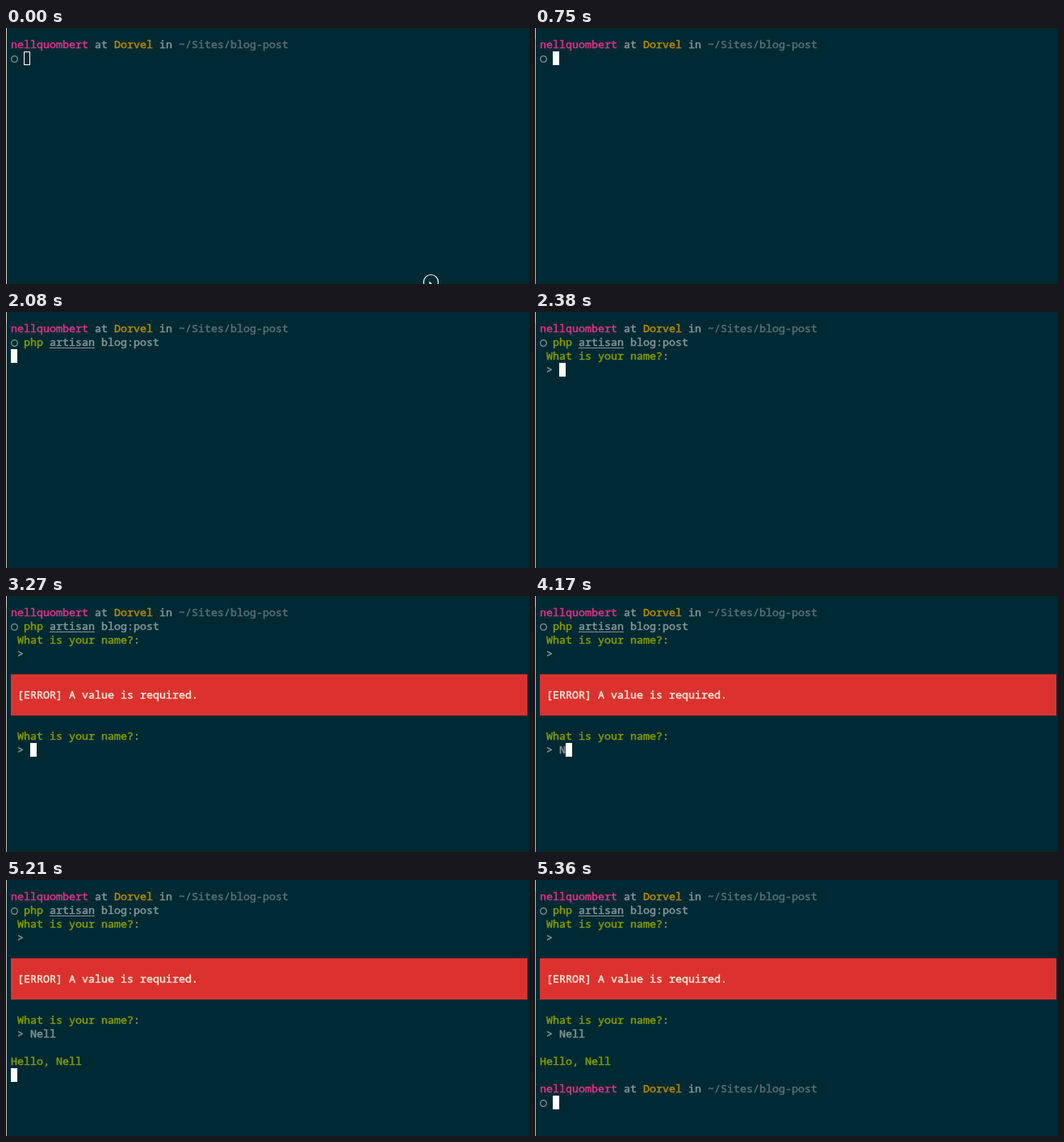
Animation, 648 px wide and 317 px high, one loop 7310 ms. Source, as an HTML page:

```html
<!DOCTYPE html>
<html lang="en">
<head>
<meta charset="utf-8">
<title>Terminal session</title>
<style>
  html, body { margin: 0; width: 100%; height: 100%; overflow: hidden; background: #002a33; }
  svg { display: block; width: 648px; height: 317px; }
  text {
    font: 500 13.333px "Noto Sans Mono", "DejaVu Sans Mono", monospace;
    white-space: pre; stroke-width: .5px; stroke-linejoin: round;
  }
</style>
</head>
<body>
<svg id="stage" viewBox="0 0 648 317"></svg>
<script>
const LOOP = 7310, CELL = 8, LINE = 17, LEFT = 6, TOP = 12;
const C = {
  bg: '#002a33', magenta: '#d9338a', yellow: '#b58900', green: '#859900',
  text: '#839496', dim: '#586e75', red: '#dc322f', pale: '#eee8d5', white: '#ffffff'
};
const USER = 'nellquombert', HOST = 'Dorvel', NAME = 'Nell';
const stage = document.getElementById('stage');
const timed = [];
const x = col => LEFT + col * CELL;
const y = row => TOP + row * LINE;

function add(tag, attrs, from = 0, to = LOOP) {
  const node = document.createElementNS('http://www.w3.org/2000/svg', tag);
  for (const key in attrs) node.setAttribute(key, attrs[key]);
  stage.append(node);
  if (from > 0 || to < LOOP) timed.push({ node, from, to });
  return node;
}

// The thin stroke gives the text its semi-bold weight
function write(col, row, string, fill, from, to) {
  add('text', { x: x(col), y: y(row) + 13, fill, stroke: fill }, from, to).textContent = string;
}

function block(col, row, from, to) {
  add('rect', { x: x(col), y: y(row), width: CELL, height: LINE, fill: C.white }, from, to);
}

function prompt(row, from) {
  const parts = [[USER, C.magenta], ['at', C.text], [HOST, C.yellow],
                 ['in', C.text], ['~/Sites/blog-post', C.dim]];
  let col = 0;
  for (const [string, fill] of parts) {
    write(col, row, string, fill, from);
    col += string.length + 1;
  }
  add('circle', { cx: x(0) + 4.5, cy: y(row + 1) + 9.5, r: 3.8, fill: 'none',
                  stroke: C.text, 'stroke-width': 1.3 }, from);
}

function question(row, from) {
  write(1, row, 'What is your name?', C.green, from);
  write(19, row, ':', C.text, from);
  write(1, row + 1, '>', C.text, from);
}

// Window edge, dimmer once the window has focus
add('rect', { x: 0, y: 0, width: 1, height: 317, fill: '#c8ced0' });
add('rect', { x: 0, y: 14, width: 1, height: 303, fill: '#adb5b8' }, 750);

// Mouse pointer with its ring
add('circle', { cx: 526.5, cy: 314.5, r: 9.9, fill: '#001c23' }, 0, 150);
add('circle', { cx: 526.5, cy: 314.5, r: 9, fill: C.bg, stroke: C.white, 'stroke-width': 1.2 }, 0, 150);
add('path', { d: 'M524.5 313.5v5.5l3.5-2z', fill: C.white }, 0, 150);

// Commands
prompt(0);
write(2, 1, 'clear', C.green, 1340, 1490);
write(2, 1, 'php', C.green, 1490);
write(6, 1, 'artisan', C.text, 1490);
add('rect', { x: x(6), y: y(1) + 15, width: 7 * CELL, height: 1, fill: C.text }, 1490);
write(14, 1, 'blog:post', C.text, 1490);

// Empty answer, error, second try
question(2, 2380);
add('rect', { x: x(0), y: y(5), width: 80 * CELL, height: 3 * LINE, fill: C.red }, 3270);
write(1, 6, '[ERROR] A value is required.', C.pale, 3270);
question(9, 3270);
[4170, 4320, 4460, 4610].forEach((time, i) => write(3 + i, 10, NAME[i], C.text, time));
write(0, 12, 'Hello, ' + NAME, C.green, 5210);
prompt(14, 5360);

// Cursor: hollow without focus, then [time, column, row]
add('rect', { x: x(2) + .5, y: y(1) + .5, width: CELL - 1, height: LINE - 1,
              fill: 'none', stroke: C.white }, 0, 750);
const cursor = [
  [750, 2, 1], [1340, 7, 1], [1490, 23, 1], [2080, 0, 2], [2380, 3, 3], [3270, 3, 10],
  [4170, 4, 10], [4320, 5, 10], [4460, 6, 10], [4610, 7, 10], [5210, 0, 13], [5360, 2, 15]
];
cursor.forEach(([time, col, row], i) => block(col, row, time, cursor[i + 1]?.[0]));

const start = performance.now();
function draw() {
  const time = (performance.now() - start) % LOOP;
  for (const { node, from, to } of timed)
    node.style.visibility = time >= from && time < to ? 'visible' : 'hidden';
  requestAnimationFrame(draw);
}
draw();
</script>
</body>
</html>
```
